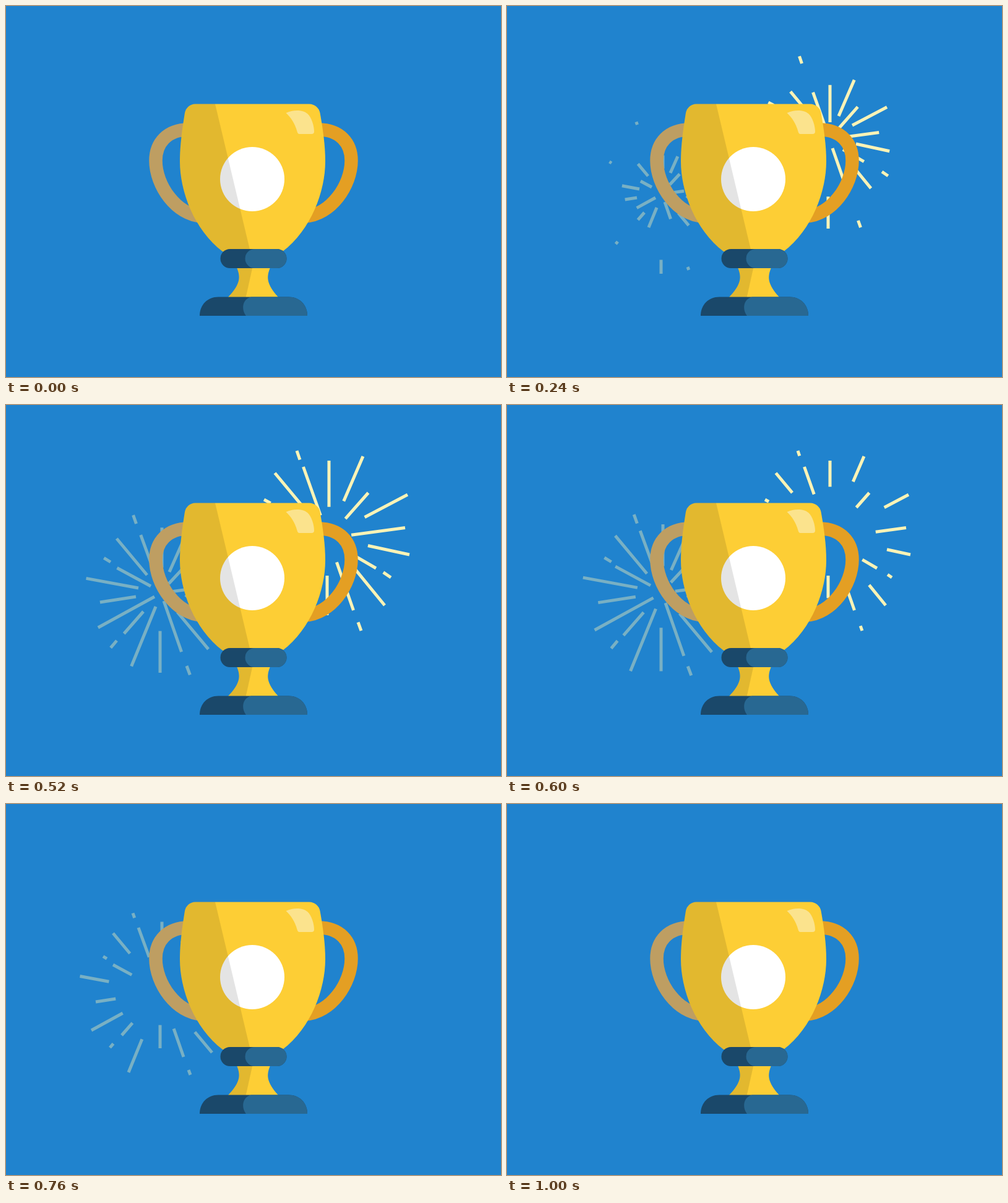
An HTML page with a canvas that plays this animation: 800x600 px, repeating every 1.04 s.

```html
<!DOCTYPE html>
<html lang="en">
<head>
<meta charset="utf-8">
<title>Trophy with fireworks</title>
<style>
  html, body { margin: 0; height: 100%; overflow: hidden; background: #2083ce; }
  canvas { display: block; width: 800px; height: 600px; }
</style>
</head>
<body>
<canvas id="stage" width="800" height="600"></canvas>
<script>
const LOOP = 1040;
const ctx = document.getElementById('stage').getContext('2d');

// Ease with flat ends; x1 and x2 are the horizontal handle positions.
function ease(x, x1 = 1 / 3, x2 = 2 / 3) {
  if (x <= 0) return 0;
  if (x >= 1) return 1;
  let lo = 0, hi = 1;
  for (let i = 0; i < 24; i++) {
    const u = (lo + hi) / 2, v = 1 - u;
    if (3 * x1 * u * v * v + 3 * x2 * u * u * v + u * u * u < x) lo = u;
    else hi = u;
  }
  return lo * lo * (3 - 2 * lo);
}

// Each ray: start x, y, end x, y
const rightRays = [
  [522, 188, 522, 90], [536, 178, 577, 83], [537, 197, 585.5, 142],
  [558, 193, 649, 145], [531, 214, 645, 198.5], [564, 223, 652, 242],
  [543, 232, 598, 264], [606, 268, 622, 279], [550, 248, 612, 324],
  [526, 230, 561.5, 332], [567.5, 347, 574, 365], [519, 360, 519, 276],
  [517, 203, 480.5, 100], [496, 184, 434.5, 110], [431, 160.5, 417, 153],
  [476.5, 93, 470, 74]
];
const leftRays = [
  [214, 296, 119.5, 278.5], [249, 433, 249, 357.5], [234, 293, 173, 260],
  [228, 275, 173, 209], [210, 310, 145, 320], [240, 310, 138, 366],
  [222, 334, 187, 374], [242, 326, 198, 434], [255, 317, 287, 409],
  [277, 335, 333, 402], [264, 270, 304, 180], [263, 289, 317, 231],
  [270, 301.5, 324, 294], [290, 307, 330, 340], [252, 263, 252, 190.5],
  [249, 296, 214, 200], [210.5, 192, 205, 176.5], [169, 254, 157, 246.5],
  [179, 381, 168, 394], [292, 422, 298, 438]
];

function drawRays(rays, color, from, to) {
  if (to - from < 0.001) return;
  ctx.beginPath();
  for (const [x, y, ex, ey] of rays) {
    const dx = ex - x, dy = ey - y;
    ctx.moveTo(x + dx * from, y + dy * from);
    ctx.lineTo(x + dx * to, y + dy * to);
  }
  ctx.strokeStyle = color;
  ctx.lineWidth = 5;
  ctx.stroke();
}

const handle = new Path2D('M505 200C540 200 558 222 558 250C558 290 525 338 483 340');
const cup = new Path2D('M306 158.5H490C499 158.5 506 165 507.5 173C512 198 516 225 516 251C516 300 493 362 447 397H350C304 362 281 300 281 251C281 225 285 198 289 173C290.5 165 297 158.5 306 158.5Z');
const cupShade = new Path2D('M270 150H336L395.5 400H270Z');
const shine = new Path2D('M452.5 173C465 167 480 168 487 174C494 180 498 194 498 203Q498 207 494 207H474Q471.500 207 470.5 203C467 190 461 181 452.500 173Z');
const badge = new Path2D();
badge.arc(398, 280, 52, 0, 7);
const stem = new Path2D('M373 423C379 438 380 449 358 472H441C420 449 421 438 427 423Z');
const stemShade = new Path2D('M350 420H399L387 474H350Z');
const base = new Path2D('M313 501C313 483 326 470.5 343 470.5H457C474 470.5 487 483 487 501Z');
const baseLight = new Path2D('M396 470.5H457C474 470.5 487 483 487 501H388C381 493 380 475 396 470.5Z');

function fill(path, color) {
  ctx.fillStyle = color;
  ctx.fill(path);
}

function shade(body, area) {
  ctx.save();
  ctx.clip(body);
  fill(area, 'rgba(0,0,0,.107)');
  ctx.restore();
}

function pill(x, width, color) {
  const path = new Path2D();
  path.roundRect(x, 393, width, 31, 15.5);
  fill(path, color);
}

function drawHandle(color) {
  ctx.strokeStyle = color;
  ctx.lineWidth = 21.5;
  ctx.stroke(handle);
}

function drawTrophy() {
  drawHandle('#e49f23');
  ctx.save();
  ctx.translate(800, 0);
  ctx.scale(-1, 1);
  drawHandle('#be9e62');
  ctx.restore();

  fill(cup, '#fdce35');
  fill(shine, '#fbe38d');
  fill(badge, '#fff');
  shade(cup, cupShade);
  fill(stem, '#fdce35');
  shade(stem, stemShade);
  pill(346.5, 107, '#1a486a');
  pill(386.5, 67, '#286892');
  fill(base, '#1a486a');
  fill(baseLight, '#286892');
}

function draw(now) {
  const t = now % LOOP;
  ctx.fillStyle = '#2083ce';
  ctx.fillRect(0, 0, 800, 600);
  drawRays(leftRays, '#78b0c4', ease((t - 556) / 408), ease(t / 720, 0.39, 0.46));
  drawRays(rightRays, '#fbf3b6', ease((t - 410) / 350), ease(t / 417));
  drawTrophy();
  requestAnimationFrame(draw);
}
requestAnimationFrame(draw);
</script>
</body>
</html>
```
